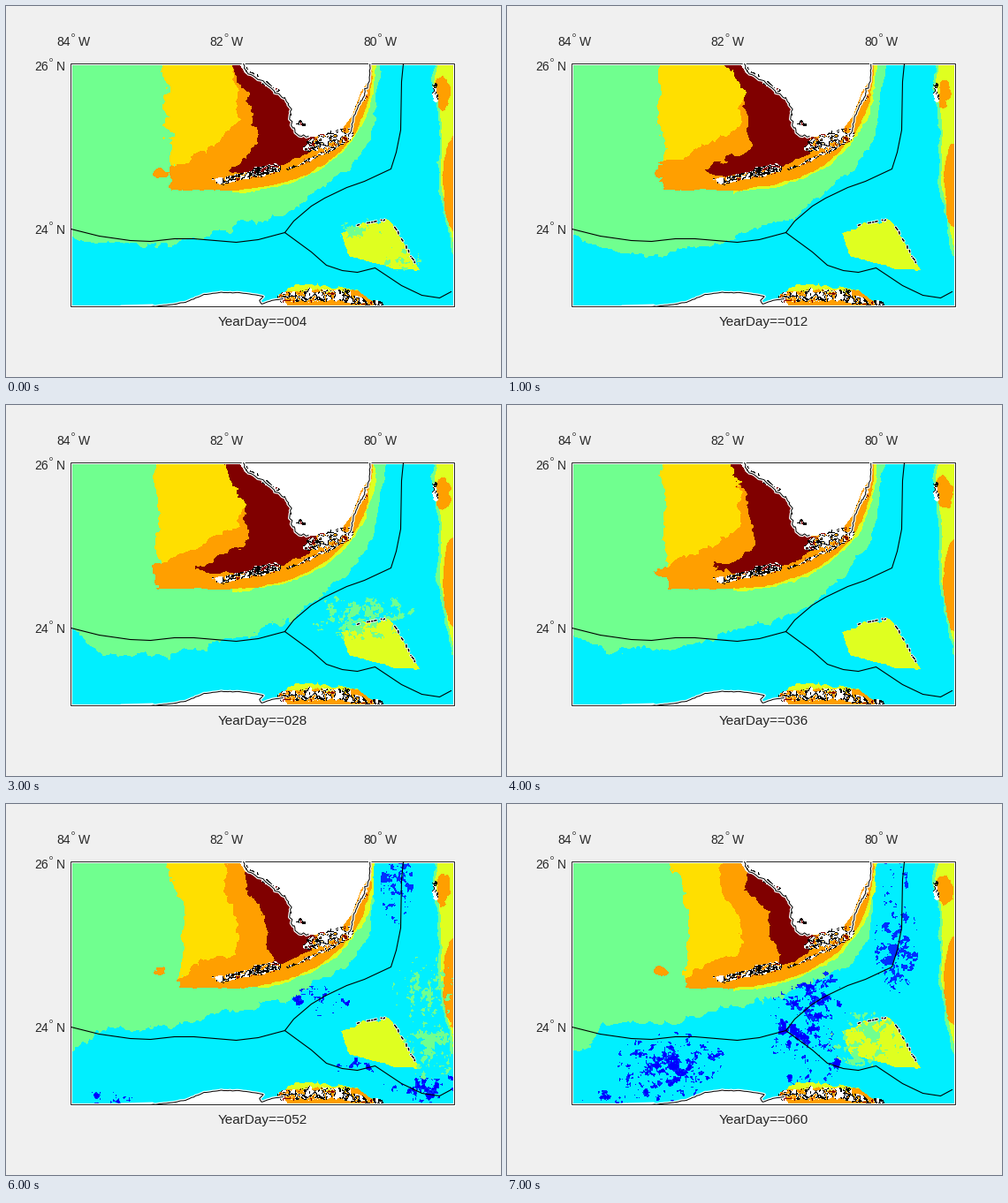
Recreate the animation shown at these times as a matplotlib script. Size 560x420 px, loop 8000 ms.

```python
import numpy as np
import matplotlib.pyplot as plt
from matplotlib.animation import FuncAnimation
from matplotlib.path import Path
from matplotlib.patches import Circle, Rectangle

W, H, DPI = 560, 420, 100
PX = 72 / DPI
X0, X1, Y0, Y1 = 73, 507, 65, 340
X, Y = np.meshgrid(np.arange(X0, X1), np.arange(Y0, Y1))
INK = "#262626"

CYAN, GREEN, LIME = (0, 239, 255), (112, 255, 143), (223, 255, 32)
YELLOW, ORANGE, DARK = (255, 223, 0), (255, 159, 0), (128, 0, 0)
BLUE, DEEP = (0, 48, 255), (0, 0, 255)
WHITE, BLACK = (255, 255, 255), (0, 0, 0)

# Band edges as key points: position, mean edge, seasonal swing
SOUTH = [(73, 268, -18), (110, 268, 18), (190, 264, 18), (250, 250, 18),
         (320, 231, 16), (385, 187, 6), (412, 150, 4)]
EAST = [(65, 422, 9), (150, 413, 2), (170, 403, 0)]
MILD = [(65, 177, -9), (120, 186, -20), (200, 188, -12)]
WARM = [(65, 255, 11), (110, 258, 13), (135, 262, 0), (155, 246, -22),
        (170, 222, -40), (185, 186, -26), (200, 186, -14)]
HOT = [(65, 258, -15), (95, 267, -4), (125, 284, -14), (155, 285, -15),
       (170, 278, -30), (182, 258, -50), (192, 290, -75)]

# Speckled patches: centre x, y, radius x, y, day of peak
COLD = [(145, 331, 24, 5, 46), (120, 333, 26, 7, 56), (438, 90, 14, 30, 55),
        (440, 160, 14, 30, 60), (356, 222, 18, 10, 52), (340, 250, 24, 46, 60),
        (185, 297, 36, 22, 60), (395, 297, 15, 7, 52), (475, 321, 28, 9, 52)]
TEPID = [(400, 252, 16, 7, 4), (445, 285, 14, 8, 4), (405, 240, 34, 16, 28),
         (475, 215, 22, 25, 53), (480, 270, 18, 24, 53), (405, 265, 25, 18, 61)]

FLORIDA = [(263, 64), (270, 76), (285, 82), (300, 91), (311, 103), (320, 112),
           (321, 130), (326, 143), (343, 148), (376, 144), (391, 124),
           (401, 97), (409, 85), (412, 64)]
WEST_COAST = [(268, 65), (271, 74), (291, 85), (309, 100), (318, 107),
              (321, 116), (320, 129), (329, 144), (343, 148)]
EAST_COAST = [(411, 65), (411, 84), (402, 106), (392, 126), (391, 139), (386, 148)]
CUBA_COAST = [(163, 340), (185, 338), (202, 335), (224, 326), (242, 324),
              (263, 324), (291, 328), (286, 333), (288, 337), (300, 333),
              (313, 331)]
SHELF = [(309, 325), (327, 315), (378, 318), (396, 320), (405, 327), (427, 341),
         (309, 341)]
CAY = [(379, 257), (400, 247), (431, 241), (438, 248), (453, 274), (467, 298),
       (440, 297), (387, 282)]
BORDERS = [
    [(73, 252), (105, 260), (140, 265), (163, 266), (190, 263), (212, 263),
     (260, 267), (285, 264), (300, 260), (315, 256)],
    [(449, 65), (447, 85), (446, 140), (441, 165), (435, 184), (405, 198),
     (385, 205), (360, 217), (345, 226), (325, 243), (315, 256)],
    [(315, 256), (345, 278), (362, 293), (380, 299), (397, 301), (417, 296),
     (447, 316), (470, 327), (490, 330), (503, 323)],
]


def noise(seed, *cells):
    """Value noise with unit spread; one octave per cell size."""
    rng = np.random.default_rng(seed)
    total = np.zeros(X.shape)
    for cell in cells:
        grid = rng.normal(size=(int(300 / cell) + 2, int(460 / cell) + 2))
        u, v = (X - X0) / cell, (Y - Y0) / cell
        i, j = v.astype(int), u.astype(int)
        fu, fv = u - j, v - i
        top = grid[i, j] * (1 - fu) + grid[i, j + 1] * fu
        low = grid[i + 1, j] * (1 - fu) + grid[i + 1, j + 1] * fu
        total += (top * (1 - fv) + low * fv) * np.sqrt(cell)
    return total / total.std()


def season(day):
    return np.cos(2 * np.pi * (day - 22) / 80)


def edge(band, at, day):
    pos, mean, swing = np.array(band).T
    return np.interp(at, pos, mean + swing * season(day))


def inside(points, rough=0):
    spots = np.c_[(X + rough).ravel(), (Y + rough).ravel()]
    return Path(points).contains_points(spots).reshape(X.shape)


def ellipse(cx, cy, rx, ry):
    return ((X - cx) / rx) ** 2 + ((Y - cy) / ry) ** 2


def tube(x0, y0, x1, y1, width):
    dx, dy = x1 - x0, y1 - y0
    t = np.clip(((X - x0) * dx + (Y - y0) * dy) / (dx * dx + dy * dy), 0, 1)
    return np.hypot(X - x0 - t * dx, Y - y0 - t * dy) < width + ROUGH


def patches(spots, day, field):
    """Strength of the patches, each fading in and out around its peak day."""
    best = np.zeros(X.shape)
    for cx, cy, rx, ry, peak in spots:
        glow = np.exp(-ellipse(cx, cy, rx, ry) / 2 - ((day - peak) / 5) ** 2)
        best = np.maximum(best, np.where(glow > .2, .75 * glow + .4 * field, 0))
    return best


ROUGH = noise(1, 6, 3)
SQUIGGLE = noise(2, 4, 2)
# Distance measure along the curved reef: 1 at its outer edge
REEF = ((np.maximum(X - 240, 0) / 174) ** 2.3 + ((Y - 65) / 143) ** 2.3) ** (1 / 2.3)

LAND = inside(FLORIDA)
CUBA = inside(CUBA_COAST + [(320, 341), (163, 341)])
SHELF_OUT = inside(SHELF, ROUGH)
SHELF_IN = SHELF_OUT & (Y > 323 + 1.5 * ROUGH) & (X < 418)
CAY_BANK = inside(CAY, .7 * ROUGH)
BANK_EDGE = np.interp(Y, [65, 85, 130, 200, 282], [488, 484, 492, 491, 507])

# Island zones: mask, line thickness, level above which water shows
ISLANDS = [
    (tube(234, 196, 246, 198, 2), .4, .5),
    (tube(252, 195, 306, 184, 5), .55, .9),
    (tube(308, 187, 328, 181, 1), .4, .4),
    (tube(330, 180, 386, 151, 1.5), .4, .7),
    (tube(345, 157, 384, 145, 8), .35, .6),
    (tube(397, 112, 406, 98, 2), .2, .3),
    (tube(272, 72, 306, 96, 2), .5, 3),
    (tube(329, 130, 337, 134, 3), .9, 3),
    (tube(484, 88, 485, 106, 1.5), .4, .5),
    (tube(314, 329, 385, 326, 6), .4, .6),
    (tube(380, 330, 422, 339, 5), .5, .6),
]


def paint(day):
    img = np.empty(X.shape + (3,), np.uint8)
    img[:] = CYAN
    n1, n2, n3 = (noise(day * 10 + k, 16, 7, 3) for k in range(3))
    fine = noise(day * 10 + 5, 7, 3, 1.5)
    u, v = X + 2.5 * n1, Y + 2.5 * n2

    img[(v < edge(SOUTH, X, day) + n3) & (X + n1 < edge(EAST, Y, day))] = GREEN
    cold = patches(COLD, day, fine) * (REEF > 1.06)
    img[cold > .7] = BLUE
    img[(cold > .95) & (Y > 200)] = DEEP

    # Reef shelf, from cool rim to hot core
    img[(REEF < 1.02 + .006 * n3) & (X > 255)] = LIME
    shelf = REEF + .004 * n2 < 1
    img[shelf & (u > edge(MILD, v, day))] = YELLOW
    img[shelf & (u > edge(WARM, v, day))] = ORANGE
    hot = (REEF + .008 * n3 < .88) & (X < 346 + 3 * n1)
    img[hot & (u > edge(HOT, v, day))] = DARK
    img[ellipse(174, 189, 8, 5) + .35 * fine < 1] = ORANGE

    # Eastern banks
    img[(X + n1 > BANK_EDGE - 3) & (Y < 283)] = GREEN
    img[(X + .5 * n1 > BANK_EDGE) & (Y < 283)] = LIME
    img[ellipse(507, 200, 13, 50) + .1 * n2 < 1] = ORANGE
    img[ellipse(494, 98, 9, 17) + .3 * n3 < 1] = ORANGE
    img[CAY_BANK] = LIME
    img[patches(TEPID, day, fine) > .7] = GREEN

    img[SHELF_OUT] = LIME
    img[SHELF_IN] = ORANGE
    img[LAND | CUBA] = WHITE
    for zone, ink, water in ISLANDS:
        img[zone & (SQUIGGLE < water)] = WHITE
        img[zone & (SQUIGGLE > 1.7)] = DARK
        img[zone & (abs(SQUIGGLE) < ink)] = BLACK
    return img


def wobble(points, amount, seed):
    """Resample a line densely and roughen it."""
    p = np.array(points, float)
    steps = np.r_[0, np.cumsum(np.hypot(*np.diff(p, axis=0).T))]
    s = np.arange(0, steps[-1], 2.5)
    line = np.c_[np.interp(s, steps, p[:, 0]), np.interp(s, steps, p[:, 1])]
    return line + np.random.default_rng(seed).normal(0, amount, line.shape)


fig = plt.figure(figsize=(W / DPI, H / DPI), dpi=DPI, facecolor="#f0f0f0")
ax = fig.add_axes([0, 0, 1, 1])
ax.set_xlim(0, W)
ax.set_ylim(H, 0)
ax.axis("off")

days = [4 + 8 * k for k in range(8)]
maps = [paint(d) for d in days]
picture = ax.imshow(maps[0], extent=(X0, X1, Y1, Y0), interpolation="nearest",
                    aspect="auto")
clip = Rectangle((X0, Y0), X1 - X0, Y1 - Y0, transform=ax.transData)


def stroke(points, width=1, color="black"):
    p = np.array(points) + .5
    line, = ax.plot(p[:, 0], p[:, 1], color=color, lw=width * PX)
    line.set_clip_path(clip)


for k, (coast, amount) in enumerate([(WEST_COAST, 1), (EAST_COAST, .6),
                                     (CUBA_COAST, .2)]):
    shore = wobble(coast, amount, k)
    stroke(shore, 3.5, "white")
    stroke(shore)
stroke([(130, 339), (165, 338)], 2, "white")

# Islets scattered along the upper rim of the bank
rim = wobble(CAY[:6], .5, 5)
for k in np.random.default_rng(6).choice(len(rim) - 1, 14, replace=False):
    stroke(rim[k:k + 2], 3, "white")
    stroke(rim[k:k + 2], 1.5)

for border in BORDERS:
    stroke(border, 1.1)

for color, width in [("white", 3), (INK, 1)]:
    ax.add_patch(Rectangle((73, 65), 434, 275, fill=False, ec=color, lw=width * PX))


def label(x, y, text, size=13.9, **kw):
    return ax.text(x, y, text, family="Liberation Sans", fontsize=size * PX,
                   color=INK, va="baseline", **kw)


def degrees(x, y, number, letter):
    label(x, y, number)
    ax.add_patch(Circle((x + 19, y - 12), 1.6, fill=False, ec=INK, lw=.6 * PX))
    label(x + 24.5, y, letter)


for k in range(3):
    degrees(57 + 173.5 * k, 45, str(84 - 2 * k), "W")
for k in range(2):
    degrees(32, 73 + 185 * k, str(26 - 2 * k), "N")
caption = label(290, 362, "", 15.2, ha="center")


def update(k):
    picture.set_data(maps[k])
    caption.set_text(f"YearDay=={days[k]:03d}")
    return picture, caption


anim = FuncAnimation(fig, update, frames=len(days), interval=1000, repeat=True)
plt.show()
```
